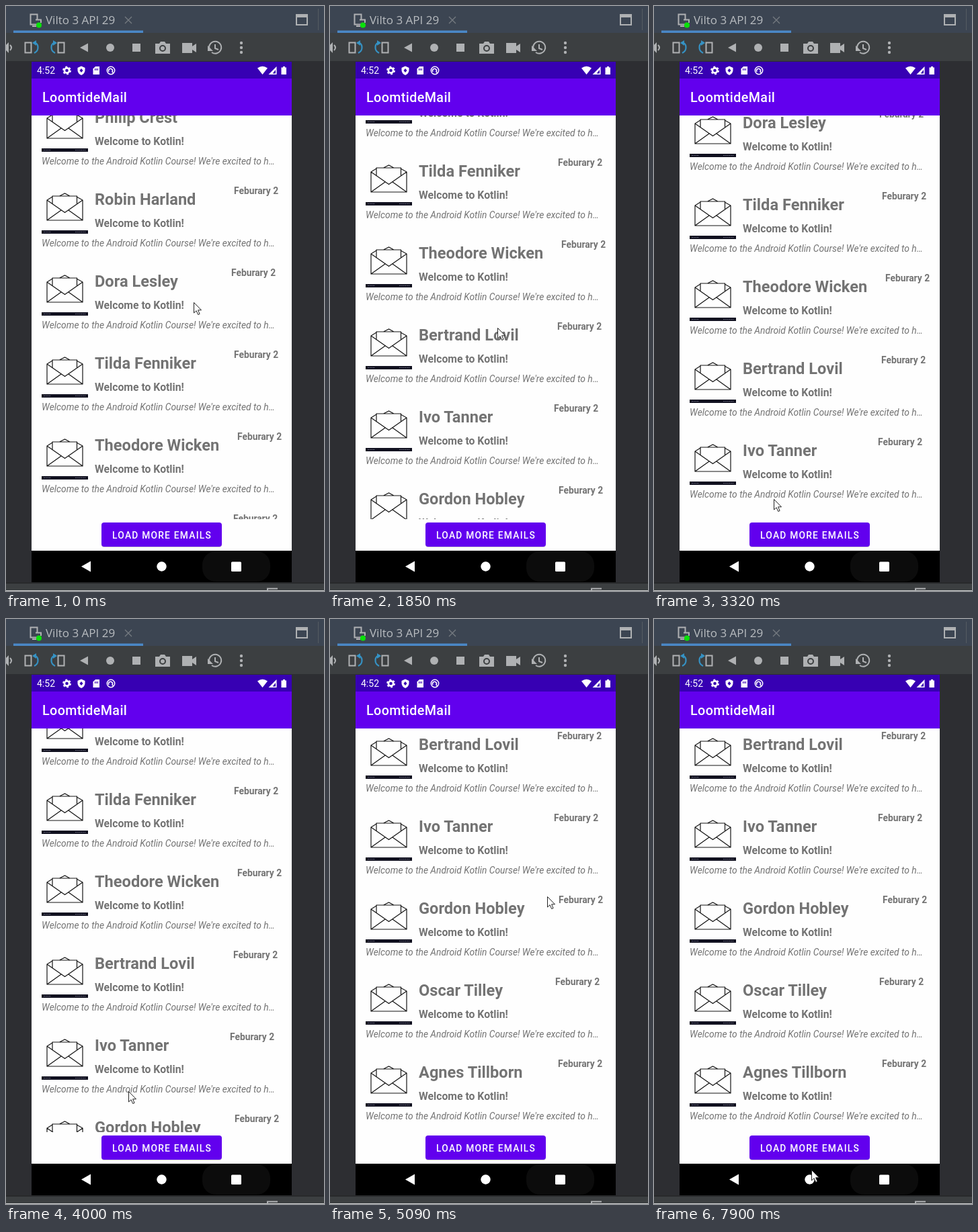
Animation of 473x871 px, one loop 8000 ms. Source, as an HTML page:

```html
<!DOCTYPE html>
<html lang="en">
<head>
<meta charset="utf-8">
<title>Mail list</title>
<style>
  html, body { margin: 0; width: 100%; height: 100%; overflow: hidden; background: #2d2e32; }
  svg { display: block; width: 473px; height: 871px; font-family: Roboto, "Noto Sans", sans-serif; }
  .tab { font: 17px "Open Sans", "Noto Sans", sans-serif; fill: #b9bdc1; }
  .clock { font-size: 14px; fill: #fff; }
  .title { font-size: 19.7px; font-weight: 500; letter-spacing: .4px; fill: #fff; }
  .row { fill: #737373; font-weight: 700; }
  .name { font-size: 23.6px; }
  .subject { font-size: 15.75px; }
  .date { font-size: 13.8px; }
  .summary { font-size: 13.8px; font-weight: 400; font-style: italic; }
  .load { font-size: 13.8px; font-weight: 500; letter-spacing: 1.23px; fill: #fff; }
  .tool { fill: #afb1b3; }
  .line { fill: none; stroke: #afb1b3; stroke-width: 2; }
  .blue { fill: none; stroke: #3592c4; stroke-width: 2.2; }
</style>
</head>
<body>
<svg viewBox="0 0 473 871">
  <defs>
    <clipPath id="listArea"><rect x="38" y="163" width="387" height="601"/></clipPath>
    <g id="envelope">
      <g fill="none" stroke="#151515" stroke-width="1.2">
        <path d="M69 -3L61 2V32H114V2L105 -3M61 2L87.5 20.5L114 2M61 32L82 17M114 32L93 17"/>
        <path d="M69 7.5V-4H105.5V7.5M79.5 -4L87.5 -8L95 -4"/>
      </g>
      <rect x="53" y="47" width="69" height="5" fill="#10101f"/>
      <path d="M56 49.5H67M103 49.5H119" stroke="#77778a" stroke-width=".8" stroke-dasharray="2 .7"/>
    </g>
    <g id="turn">
      <rect x="28.5" y="54.5" width="9" height="15" class="line"/>
      <path d="M41 54C49 55 50 66 42 70" class="blue"/>
      <path d="M45 51V59L39 55Z" fill="#3592c4"/>
    </g>
  </defs>

  <!-- emulator window -->
  <rect width="473" height="871" fill="#2d2e32"/>
  <rect width="473" height="40" fill="#3c4552"/>
  <rect y="40" width="473" height="42" fill="#3c3f41"/>
  <rect x="11" y="36.5" width="193" height="3.5" fill="#4a88c7"/>
  <rect x="464" y="4" width="1" height="32" fill="#555b62"/>
  <path d="M46 27.5H36.5V12.5H46.5V20M39 30H45M44 20.5H52V25" class="line"/>
  <circle cx="49" cy="28.5" r="4" fill="#0be00b"/>
  <text x="59" y="27" class="tab">Vilto 3 API 29</text>
  <path d="M177 16L187 26M187 16L177 26" stroke="#747a80" stroke-width="1.4"/>
  <rect x="432" y="13" width="16" height="15" class="line"/>
  <rect x="431" y="12" width="18" height="5" class="tool"/>

  <!-- emulator toolbar -->
  <path d="M0 58L4 54V70L0 66Z" class="tool"/>
  <path d="M6 58Q10 62 6 66" class="line"/>
  <use href="#turn"/>
  <use href="#turn" transform="translate(115 0) scale(-1 1)"/>
  <g class="tool">
    <path d="M110 62L122 55.5V68.5Z"/>
    <circle cx="155" cy="62" r="6"/>
    <rect x="188" y="56" width="12" height="12"/>
    <path d="M222 56H228L230 53H236L238 56H244V71H222Z"/>
    <circle cx="233" cy="63" r="4" stroke="#3c3f41" stroke-width="2"/>
    <path d="M262 55H277V60L283 56V69L277 65V70H262Z"/>
    <path d="M300 59V67H308Z"/>
  </g>
  <path d="M350 55V70" class="line" style="stroke-width:4.4;stroke-linecap:round;stroke-dasharray:0 7"/>
  <path d="M302.5 64A9 9 0 1 1 306 69M311 57V63L316 65" class="line"/>

  <!-- phone -->
  <rect x="38" y="163" width="387" height="648" fill="#fefefe"/>
  <g clip-path="url(#listArea)">
    <g id="list"></g>
    <path id="glow" fill="#6200ee"/>
  </g>
  <rect x="38" y="83" width="387" height="25" fill="#3700b3"/>
  <rect x="38" y="108" width="387" height="55" fill="#6200ee"/>
  <text x="46" y="101" class="clock">4:52</text>
  <text x="54" y="143" class="title">LoomtideMail</text>
  <g fill="none" stroke="#fff">
    <circle cx="90.5" cy="96" r="3.6" stroke-width="2.6"/>
    <circle cx="90.5" cy="96" r="5.5" stroke-width="1.8" stroke-dasharray="2.88"/>
    <circle cx="156" cy="96" r="5.7" stroke-width="1.5"/>
    <path d="M153 98A3 3 0 1 1 158 98L160 100" stroke-width="1.5"/>
  </g>
  <g fill="#fff">
    <path d="M112 89.5L117.5 92V96Q117 101 112 103Q107 101 106.5 96V92Z"/>
    <path d="M133 90H139V102H129.5V93.5Z"/>
    <path d="M374 92.5Q381.5 87 389 92.5L381.5 102Z"/>
    <path d="M390.5 102L402.5 90V102Z"/>
    <path d="M409.5 91.5H412V90H415V91.5H417V102H409.5Z"/>
  </g>
  <g fill="#3700b3">
    <path d="M112 93L114.5 96L112 99L109.5 96Z"/>
    <path d="M132 93H133V96H132ZM134 93H135V96H134ZM136 93H137V96H136Z"/>
    <path d="M396.5 100.5L401 95V100.5Z"/>
  </g>

  <rect x="142" y="770" width="179" height="36" rx="4" opacity=".16"/>
  <rect x="142" y="769" width="179" height="36" rx="4" fill="#6200ee"/>
  <text x="158" y="792.5" class="load">LOAD MORE EMAILS</text>

  <rect x="38" y="811" width="387" height="47"/>
  <rect x="292" y="812" width="101" height="45" rx="20" fill="#0c0c0c"/>
  <g fill="#fff">
    <path d="M112 834.5L126 826.5V842.5Z"/>
    <circle cx="231.5" cy="834.5" r="7.2"/>
    <rect x="335" y="827.5" width="15" height="14.5" rx="1.5"/>
  </g>
  <rect y="858" width="473" height="2" fill="#28292b"/>
  <rect y="860" width="473" height="10" fill="#3c3f41"/>
  <rect y="870" width="473" height="1" fill="#d5d6d7"/>
  <path d="M389 871V867.5H404" class="line"/>

  <path id="cursor" d="M0 0V15.5L3.6 12.2L6.2 18L8.6 17L6.1 11.3H11Z" fill="#fff" stroke="#222"/>
</svg>
<script>
const LOOP = 8000, STEP = 120, PITCH = 121.95;
const $ = id => document.getElementById(id);

const mails = {
  "Philip Crest": 335, "Robin Harland": 339, "Dora Lesley": 335,
  "Tilda Fenniker": 339, "Theodore Wicken": 344, "Bertrand Lovil": 338,
  "Ivo Tanner": 333, "Gordon Hobley": 340, "Oscar Tilley": 335,
  "Agnes Tillborn": 339
};

$("list").innerHTML = Object.entries(mails).map(([name, dateX], i) => `
  <g class="row" transform="translate(0 ${Math.round(287 + PITCH * (i - 1))})">
    <use href="#envelope"/>
    <text class="name" x="132" y="8.5">${name}</text>
    <text class="subject" x="132" y="42">Welcome to Kotlin!</text>
    <text class="date" x="${dateX}" y="-7">Feburary 2</text>
    <text class="summary" x="53" y="71">Welcome to the Android Kotlin Course! We're excited to h…</text>
  </g>`).join("");

let pose = { scroll: 0, x: 279, y: 441, glow: 0 };
const steps = [{ time: 0, pose }];

// Moves to a new pose in equal jumps, the first and last at the given times.
function move(first, final, change) {
  const start = pose, goal = { ...pose, ...change };
  const gaps = Math.round((final - first) / STEP);
  for (let k = 0; k <= gaps; k++) {
    const part = (k + 1) / (gaps + 1);
    pose = {};
    for (const key in goal) pose[key] = Math.round(start[key] + (goal[key] - start[key]) * part);
    steps.push({ time: first + (gaps && (final - first) * k / gaps), pose });
  }
}
const jump = (time, change) => move(time, time, change);

jump(140, { scroll: 139 });
jump(710, { scroll: 163, y: 411 });
move(860, 1340, { scroll: 245, x: 288, y: 330 });
jump(1610, { scroll: 252, x: 243, y: 512 });
move(1730, 1850, { scroll: 286, x: 249, y: 479 });
move(1970, 2210, { scroll: 420, x: 275, y: 345 });
jump(2600, { scroll: 416, x: 232, y: 540 });
move(2720, 3320, { scroll: 236, x: 178, y: 734 });
move(4000, 4240, { scroll: 318, x: 189, y: 641 });
jump(4390, { scroll: 365, x: 195, y: 587 });
jump(4540, { scroll: 589, x: 299, y: 291, glow: 44 });
move(4680, 4820, { glow: 0 });
jump(5090, { x: 323, y: 413 });
jump(5240, { y: 457 });
jump(5380, { x: 308, y: 488 });
jump(5810, { x: 261, y: 557 });
jump(6370, { x: 262, y: 503 });
move(6490, 6740, { x: 270, y: 444, glow: 30 });
move(6880, 7000, { x: 276, y: 425, glow: 46 });
jump(7150, { glow: 22 });
move(7300, 7660, { x: 240, y: 852, glow: 0 });
move(7780, 7900, { x: 234, y: 820 });

function draw(now) {
  const t = now % LOOP;
  const { scroll, x, y, glow } = steps.findLast(s => s.time <= t + 0.5).pose;
  $("list").setAttribute("transform", `translate(0 ${-scroll})`);
  $("cursor").setAttribute("transform", `translate(${x + 0.5} ${y + 0.5})`);
  $("glow").setAttribute("d", `M38 764Q231.5 ${764 - 2 * glow} 425 764Z`);
  $("glow").setAttribute("opacity", 0.13 * glow / 44);
}

function tick() {
  draw(performance.now());
  requestAnimationFrame(tick);
}
tick();
</script>
</body>
</html>
```
